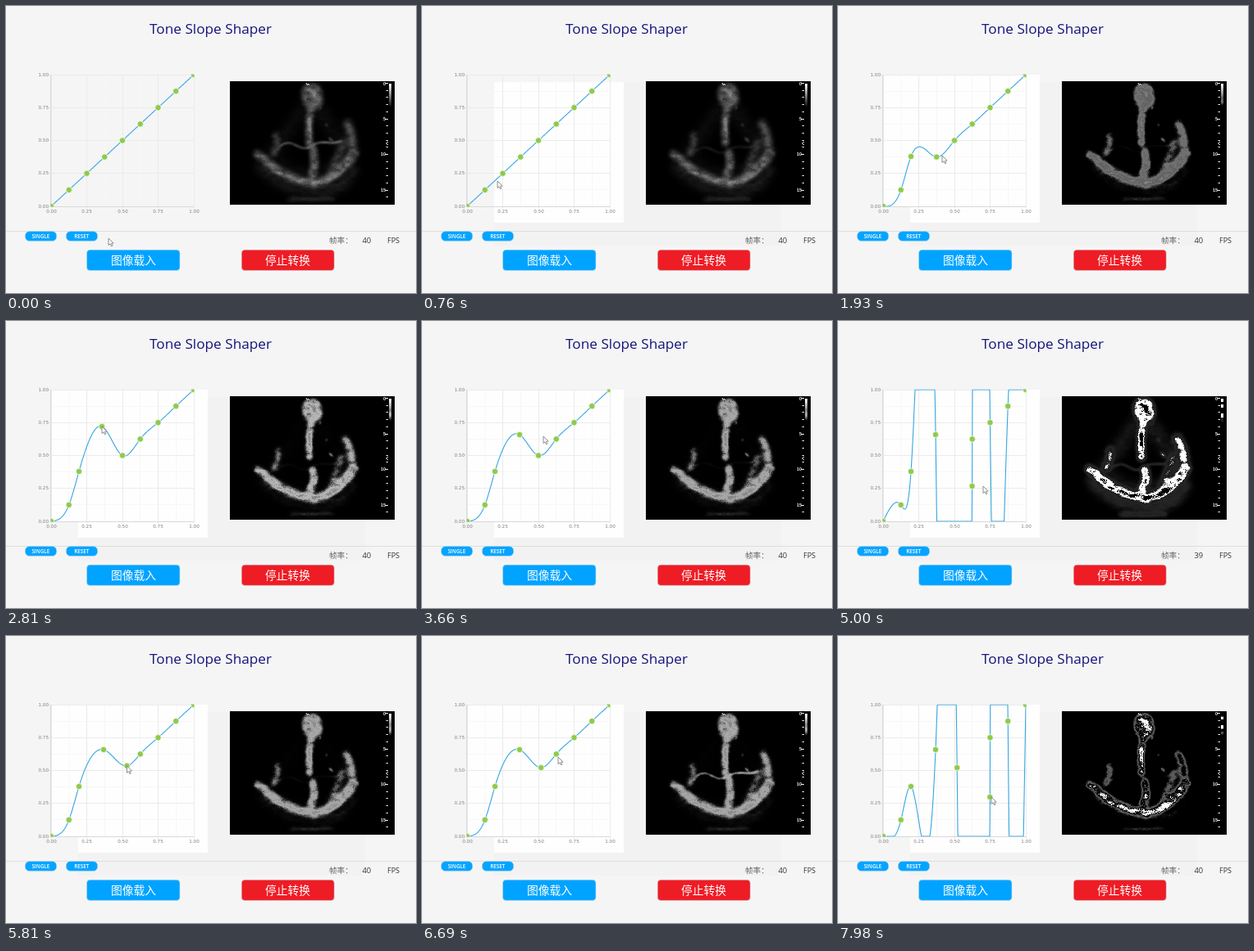
Write an HTML page with a canvas that moves like this. It is 500 by 351 pixels and loops after 8000 ms.

```html
<!DOCTYPE html>
<html lang="en">
<head>
<meta charset="utf-8">
<title>Tone Slope Shaper</title>
<style>
  html, body { margin: 0; width: 100%; height: 100%; overflow: hidden; background: #f5f5f5; }
  #shade { position: absolute; left: 88px; top: 93px; width: 350px; height: 200px; background: #f2f2f2; }
  canvas { position: absolute; left: 273px; top: 92px; }
  svg { position: absolute; left: 0; top: 0; }
  text { font-family: "Open Sans", "Noto Sans", sans-serif; }
  .cjk { font-family: "Noto Sans CJK SC", "Noto Sans CJK", sans-serif; }
  .axis text { font: 5.6px "DejaVu Sans", sans-serif; fill: #808080; }
  .scale text { font: bold 5.5px "Liberation Sans", sans-serif; fill: #eee; text-anchor: end; }
  .button text { fill: #fff; text-anchor: middle; }
</style>
</head>
<body>
<div id="shade"></div>
<canvas id="scan" width="201" height="151"></canvas>
<svg width="500" height="351" viewBox="0 0 500 351">
  <defs><clipPath id="plot"><rect x="54.5" y="83.5" width="175" height="162"/></clipPath></defs>
  <g fill="#fefefe">
    <rect id="panelA" x="88" y="93" width="158" height="172"/>
    <rect id="panelB" x="55" y="84" width="191" height="162"/>
  </g>
  <text x="249.5" y="34" font-size="17.2" text-anchor="middle" fill="#15157c">Tone Slope Shaper</text>
  <path id="minor" fill="none" stroke="#f7f7f7"/>
  <path id="major" fill="none" stroke="#ebebeb"/>
  <path d="M54.5 84V245.5H229" fill="none" stroke="#d8d8d8"/>
  <g class="axis" id="axis"></g>
  <g clip-path="url(#plot)">
    <path id="curve" fill="none" stroke="#36a6e2" stroke-width="1.1" stroke-linejoin="round"/>
    <g id="dots" fill="#8fca4c" stroke="#f8fcf2" stroke-width=".8"></g>
  </g>
  <path d="M0 275.5H500" stroke="#dedede"/>
  <g class="button">
    <g stroke="#d3dde4" stroke-width=".5">
      <rect x="23.3" y="275.6" width="38.4" height="11.8" rx="5.2" fill="#05a4ff"/>
      <rect x="73.3" y="275.6" width="38.4" height="11.8" rx="5.2" fill="#05a4ff"/>
      <rect x="98.5" y="298.2" width="113.5" height="25.2" rx="4" fill="#00a3ff"/>
      <rect x="287.3" y="298.2" width="113" height="25.2" rx="4" fill="#ee1c25"/>
    </g>
    <g font-size="6.3" font-weight="600">
      <text x="42.3" y="284">SINGLE</text>
      <text x="92.3" y="284">RESET</text>
    </g>
    <text class="cjk" x="155.5" y="316.3" font-size="13.8">图像载入</text>
    <text class="cjk" x="343.5" y="316.3" font-size="13.8">停止转换</text>
  </g>
  <g font-size="9.4" fill="#333">
    <text class="cjk" x="394" y="290" font-size="9.6" fill="#666">帧率：</text>
    <text id="rate" x="434.5" y="290">40</text>
    <text x="465" y="290" font-size="9">FPS</text>
  </g>
  <g class="scale" id="scale">
    <path id="ticks" stroke="#eee" fill="none"/>
    <path d="M366 94l1.5 3 1-2 1.5 2M466 166l-2.5 2 2.5 2" stroke="#eee" fill="none"/>
  </g>
  <path id="cursor" d="M0 0V8.6L2 6.8 3.5 9.8 4.9 9.1 3.5 6.3 6.1 6.1Z" fill="#fbfbfb" stroke="#777" stroke-width=".8"/>
</svg>
<script>
const LOOP = 8000, LEFT = 55, TOP = 84, WIDE = 174, TALL = 161, GAP = 0.18;
const W = 201, H = 151;
const $ = id => document.getElementById(id);
const clamp = (v, lo, hi) => Math.min(hi, Math.max(lo, v));

// Pointer path: time, x, y
const route = [
  [0, 125, 284], [760, 92, 214], [900, 98.5, 204.8], [1300, 92, 191], [1640, 89, 184],
  [1760, 92, 185], [1930, 127, 183], [2150, 120.3, 184.6], [2800, 117, 129],
  [3250, 119, 139], [3400, 140, 134], [3660, 148, 141], [4050, 142, 164.5],
  [4240, 142, 164.5], [4700, 160, 191], [5000, 177, 202], [5400, 168, 196],
  [5850, 147, 158], [6200, 145.2, 161], [6690, 166, 148], [6820, 163.7, 144.4],
  [7400, 174, 172], [7980, 187, 197], [8000, 187, 197]
];
// Dragged handles: index, start, end
const drags = [[2, 900, 1640], [3, 2150, 3250], [4, 4240, 6200], [5, 6820, LOOP]];

function pointer(t) {
  const i = Math.max(1, route.findIndex(r => r[0] >= t));
  const [t0, x0, y0] = route[i - 1], [t1, x1, y1] = route[i];
  const u = (t - t0) / (t1 - t0), k = u * u * (3 - 2 * u);
  return [x0 + (x1 - x0) * k, y0 + (y1 - y0) * k];
}

function handles(t) {
  const pts = Array.from({ length: 9 }, (_, i) => [LEFT + WIDE * i / 8, TOP + TALL * (1 - i / 8)]);
  for (const [i, start, end] of drags) {
    if (t <= start) continue;
    const [x, y] = pointer(Math.min(t, end));
    pts[i] = [clamp(x, pts[i - 1][0] + GAP, pts[i + 1][0] - GAP), clamp(y, TOP, TOP + TALL)];
  }
  return pts;
}

// Natural cubic spline, clipped to the plot
function spline(p) {
  const n = p.length - 1, m = Array(n + 1).fill(0), c = [0], d = [0];
  const h = i => p[i + 1][0] - p[i][0];
  const slope = i => (p[i + 1][1] - p[i][1]) / h(i);
  for (let i = 1; i < n; i++) {
    const w = 2 * (h(i - 1) + h(i)) - h(i - 1) * c[i - 1];
    c[i] = h(i) / w;
    d[i] = (6 * (slope(i) - slope(i - 1)) - h(i - 1) * d[i - 1]) / w;
  }
  for (let i = n - 1; i > 0; i--) m[i] = d[i] - c[i] * m[i + 1];
  return x => {
    let i = 0;
    while (i < n - 1 && x > p[i + 1][0]) i++;
    const s = h(i), a = (p[i + 1][0] - x) / s, b = 1 - a;
    const y = a * p[i][1] + b * p[i + 1][1] +
      ((a ** 3 - a) * m[i] + (b ** 3 - b) * m[i + 1]) * s * s / 6;
    return clamp(y, TOP, TOP + TALL);
  };
}

// Seeded speckle: coarse patches plus fine grain
let seed = 17;
const random = () => (seed = (seed * 16807) % 2147483647) / 2147483647;
const grain = Float32Array.from({ length: W * H }, random);
const mix = (a, b, k) => a + (b - a) * k;

function patches(x, y) {
  const i = Math.floor(x), j = Math.floor(y), at = (a, b) => grain[b * W + a];
  return mix(mix(at(i, j), at(i + 1, j), x - i), mix(at(i, j + 1), at(i + 1, j + 1), x - i), y - j);
}
const speckle = grain.map((g, i) =>
  0.45 + 0.75 * patches(i % W / 6, Math.floor(i / W) / 3.5) + 0.35 * g);

const scan = $('scan').getContext('2d');
const echo = Object.assign(document.createElement('canvas'), { width: W, height: H })
  .getContext('2d', { willReadFrequently: true });

function band(path, width, level, blur) {
  const g = Math.round(level * 255);
  echo.filter = `blur(${blur}px)`;
  echo.strokeStyle = `rgb(${g},${g},${g})`;
  echo.lineWidth = width;
  echo.stroke(new Path2D(path));
}

function drawEcho(t) {
  const beat = Math.cos(t / 1100 * 2 * Math.PI), v = 82 - 4 * beat, s = 1.5 * beat;
  echo.globalCompositeOperation = 'source-over';
  echo.filter = 'none';
  echo.fillStyle = '#000';
  echo.fillRect(0, 0, W, H);
  echo.globalCompositeOperation = 'lighten';
  echo.lineCap = echo.lineJoin = 'round';
  band('M99 22L48 94Q98 138 148 92Z', 16, 0.045, 6);
  band('M40 104Q64 130 100 133T148 108', 16, 0.09, 5);
  band('M72 144H126', 4, 0.17, 2);
  band(`M100 14L101 ${21 + s}`, 24, 0.31, 2.5);
  band('M98 10L104 16', 5, 0.42, 2);
  band(`M99 32Q95 52 97 ${76 + s}`, 8, 0.33, 2);
  band(`M97 46L98 ${68 + s}`, 3, 0.46, 1.2);
  band(`M101 ${v + 4}Q106 98 ${98 + s} 118`, 9, 0.35, 2.2);
  band(`M58 ${v + 5}Q68 ${v - 7} 80 ${v}T98 ${v + 2}Q106 ${v - 4} 118 ${v - 3}T136 ${v - 5}`,
    2, 0.12 + 0.3 * Math.max(0, beat), 0.9);
  band(`M${57 - s} 66Q60 76 54 88`, 7, 0.22, 2.5);
  band(`M${142 + s} 52Q152 72 149 92L130 110`, 9, 0.28, 3);
  band(`M${138 + s} 74L122 112`, 6, 0.27, 3);
  band('M34 89L58 109Q82 123 104 125Q132 118 152 88', 9, 0.35, 2.6);
  band('M52 108Q76 122 102 124T142 102', 3, 0.45, 1.4);
  band('M110 32V33M122 70L125 73M118 53V54', 3, 0.22, 0.9);
  echo.filter = 'none';
  const ramp = echo.createLinearGradient(0, 3, 0, 32);
  ramp.addColorStop(0, '#fff');
  ramp.addColorStop(1, '#000');
  echo.fillStyle = ramp;
  echo.fillRect(194, 3, 3, 29);
}

function drawScan(t, curve) {
  drawEcho(t);
  const tone = Array.from({ length: 256 }, (_, i) =>
    255 * (TOP + TALL - curve(LEFT + WIDE * i / 255)) / TALL);
  const frame = echo.getImageData(0, 0, W, H), px = frame.data;
  for (let i = 0; i < W * H; i++) {
    const gain = i % W > 188 ? 1 : speckle[i];
    const level = Math.min(255, Math.round(px[4 * i] * gain));
    px[4 * i] = px[4 * i + 1] = px[4 * i + 2] = tone[level];
  }
  scan.putImageData(frame, 0, 0);
}

function add(parent, tag, attrs, label = '') {
  const node = document.createElementNS('http://www.w3.org/2000/svg', tag);
  for (const key in attrs) node.setAttribute(key, attrs[key]);
  node.textContent = label;
  return parent.appendChild(node);
}

function buildStatic() {
  let minor = '', major = '', ticks = '';
  for (let i = 0; i <= 8; i++) {
    const x = Math.floor(LEFT + WIDE * i / 8) + 0.5, y = Math.floor(TOP + TALL * (1 - i / 8)) + 0.5;
    const line = `M${x} ${TOP}V245M${LEFT} ${y}H229`;
    if (i % 2) { minor += line; continue; }
    major += line + `M${x} 245v3M52 ${y}h3`;
    const label = (i / 8).toFixed(2);
    add($('axis'), 'text', { x: 52, y: y + 1.8, 'text-anchor': 'end' }, label);
    add($('axis'), 'text', { x, y: 253, 'text-anchor': 'middle' }, label);
  }
  for (let i = 0; i <= 16; i++) ticks += `M${i % 5 ? 463.5 : 462} ${Math.round(94 + i * 8.7) + 0.5}H466`;
  for (let i = 0; i < 4; i++) add($('scale'), 'text', { x: 463, y: 96.5 + i * 43.4 }, i * 5);
  $('minor').setAttribute('d', minor);
  $('major').setAttribute('d', major);
  $('ticks').setAttribute('d', ticks);
}

buildStatic();
const dots = Array.from({ length: 9 }, () => add($('dots'), 'circle', { r: 3.7 }));
const show = (id, on) => { $(id).style.display = on ? '' : 'none'; };

function render(t) {
  const pts = handles(t), curve = spline(pts);
  let d = '';
  for (let x = LEFT; x <= LEFT + WIDE; x += 0.25) d += `${d ? 'L' : 'M'}${x} ${curve(x).toFixed(2)}`;
  $('curve').setAttribute('d', d);
  dots.forEach((dot, i) => {
    dot.setAttribute('cx', pts[i][0]);
    dot.setAttribute('cy', pts[i][1]);
  });
  $('cursor').setAttribute('transform', `translate(${pointer(t)})`);
  show('shade', t >= 50);
  show('panelA', t >= 50);
  show('panelB', t >= 880);
  $('rate').textContent = t >= 4000 && t < 5400 ? 39 : 40;
  drawScan(t, curve);
}

const begin = performance.now();
function tick() {
  render((performance.now() - begin) % LOOP);
  requestAnimationFrame(tick);
}
tick();
</script>
</body>
</html>
```
